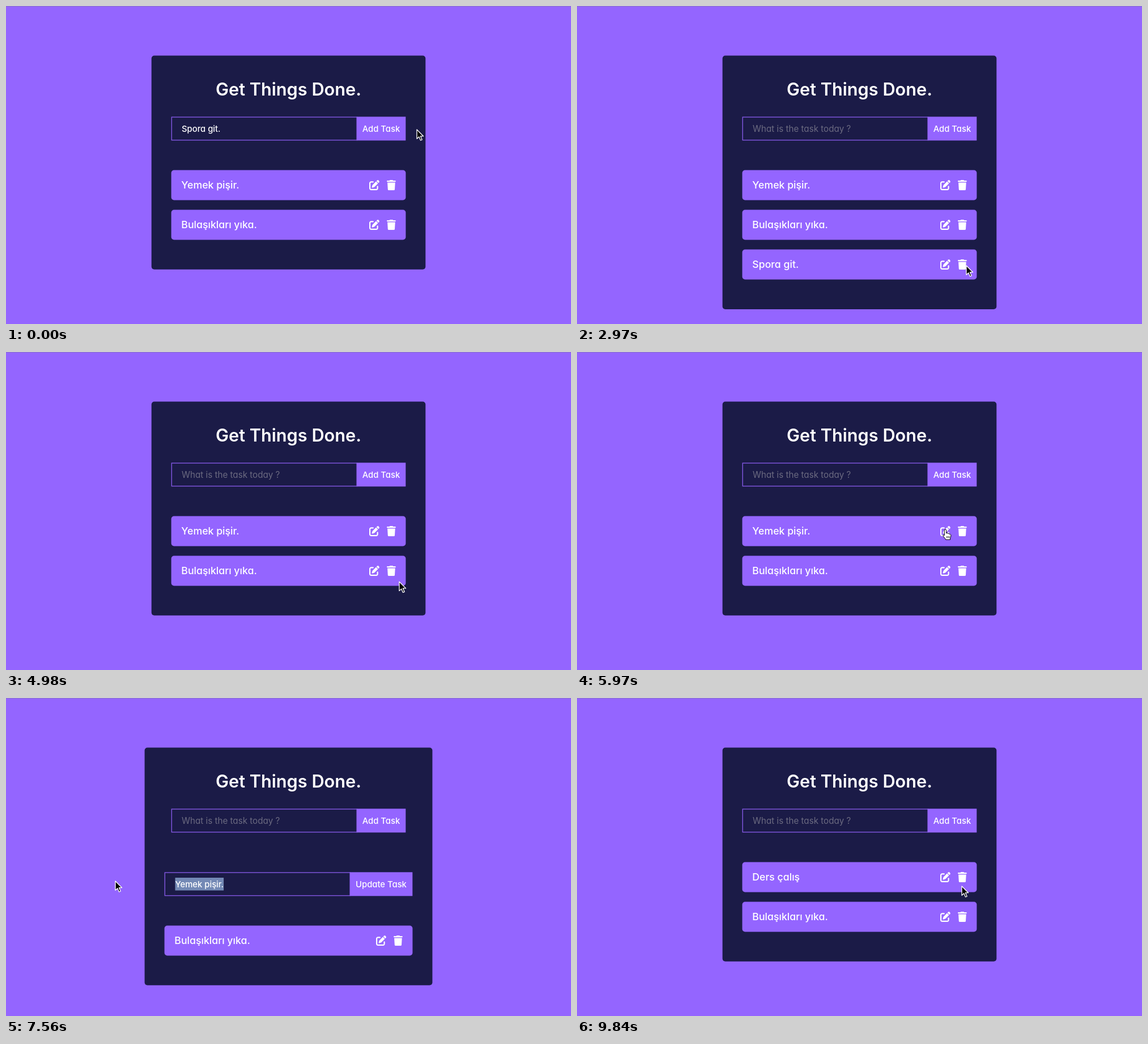
Animation of 997 by 561 pixels, one loop 9.87 s. Source, as an HTML page:

```html
<!DOCTYPE html>
<html lang="tr">
<head>
<meta charset="utf-8">
<title>Tasks</title>
<style>
  html, body { margin: 0; width: 100%; height: 100%; overflow: hidden; background: #9465ff; }
  svg { display: block; width: 997px; height: 561px; }
  text { font-family: Inter, "Open Sans", sans-serif; font-optical-sizing: none;
         font-feature-settings: "cv11"; fill: #fff; white-space: pre; }
  .title { font-size: 30.7px; font-weight: 600; }
  .task { font-size: 17.7px; font-weight: 500; }
  .field { font-size: 14.8px; font-weight: 500; }
  .hint { font-size: 15.2px; fill: #6b6a80; }
  .box { fill: none; stroke: #8257e2; stroke-width: 1.4; }
  .purple { fill: #9465ff; }
  .navy { fill: #1b1b47; }
  .white { fill: #fff; }
</style>
</head>
<body>
<svg viewBox="0 0 997 561">
  <defs>
    <g id="pen">
      <path d="M6.75 3.4H3.4A2.25 2.25 0 0 0 1.1 5.6V14.6A2.25 2.25 0 0 0 3.4 16.9H12.4A2.25 2.25 0 0 0 14.6 14.6V11.25"
            fill="none" stroke="#fff" stroke-width="2.2" stroke-linecap="round"/>
      <path class="white" d="M6.1 8.5Q5.7 8.8 5.6 9.3L4.55 12.4Q4.4 13.6 5.6 13.45L8.7 12.4Q9.2 12.2 9.5 11.95L15.4 6.1 11.95 2.6z
            M16.6 .76a2 2 0 0 0-2.8 0L12.7 1.8 16.2 5.3 17.25 4.2a2 2 0 0 0 0-2.8z"/>
    </g>
    <path id="bin" class="white" d="M1.1 1.1H4.5L5 .5Q5.3 0 5.8 0H10Q10.5 0 10.8 .5L11.3 1.1H14.7a1.1 1.1 0 0 1 0 2.2H1.1a1.1 1.1 0 0 1 0-2.2z
          M1.1 4.5H14.7L14 16.5Q13.9 18 12.3 18H3.5Q1.9 18 1.8 16.5z"/>
    <path id="beam" d="M-3-8Q0-8 0-6V6Q0 8-3 8M3-8Q0-8 0-6M0 6Q0 8 3 8" fill="none"/>
  </defs>

  <rect class="purple" width="997" height="561"/>
  <rect width="997" height="1" fill="#8870cc"/>
  <rect id="panel" class="navy" y="87.6" rx="5"/>
  <text class="title" x="498.5" y="157.5" text-anchor="middle">Get Things Done.</text>

  <rect class="box" x="292.3" y="196" width="327" height="40.6"/>
  <rect class="purple" x="618.7" y="195.3" width="86.6" height="42"/>
  <text class="field" x="662" y="221.5" text-anchor="middle">Add Task</text>
  <text id="hint" class="hint" x="310" y="221.5">What is the task today ?</text>
  <text id="entry" class="field" x="310" y="221.5">Spora git.</text>

  <g id="editor">
    <rect class="box" x="280.3" y="308" width="327" height="40.6"/>
    <rect class="purple" x="606.7" y="307.3" width="110.6" height="42"/>
    <text class="field" x="662" y="333.5" text-anchor="middle">Update Task</text>
    <rect id="mark" y="317" height="22.5" fill="#7389b5"/>
    <text id="draft" class="field" x="298.5" y="333.5"></text>
  </g>
  <g id="list"></g>
  <rect id="caret" class="white" width="1" height="21"/>

  <g id="cursor">
    <path id="arrow" d="M0 0V16.2L3.8 12.7 6.5 19 9.2 17.9 6.5 11.7H11.6z" stroke="#fff" stroke-width="1.3" stroke-linejoin="round"/>
    <g id="hand" stroke="#000" stroke-linejoin="round">
      <path class="white" d="M-1.7 .8Q-1.7-1 0-1T1.7 .8V6Q2.2 5 3.4 5.3 4.5 5.5 4.6 6.5 5.5 5.8 6.5 6.3 7.3 6.7 7.4 7.6 8.3 7.2 9.1 7.8 9.9 8.4 9.8 9.6 9.8 12 8.6 14.2V17H.6Q0 15.3-1.6 13.6-3.4 11.6-4 10.2-4.2 8.6-2.8 8.8L-1.7 9.8z"/>
      <path d="M2.6 11v3M4.8 11v3M7 11v3" stroke-width=".9"/>
    </g>
    <g id="ibeam">
      <use href="#beam" stroke="#fff" stroke-width="2.8"/>
      <use href="#beam" stroke="#000" stroke-width="1.2"/>
    </g>
  </g>
</svg>
<script>
const LOOP = 9870;
const ADD = 1410, REMOVE = 3510, EDIT = 6000, DRAG = 6500, TYPE = 7620, SAVE = 8760;
const KEY_MS = 55;
const OLD_TASK = "Yemek pişir.", NEW_TASK = "Ders çalış";

// time, x, y of the pointer tip
const path = [
  [0, 725, 218], [1080, 725, 218], [1320, 690, 223], [1560, 690, 223],
  [2100, 703, 280], [2940, 687, 458], [3060, 687, 458], [3180, 682, 450],
  [4230, 682, 450], [5010, 694, 405], [5850, 650, 314], [6060, 650, 314],
  [DRAG, 390, 328], [7000, 165, 327], [7200, 165, 327], [7540, 193, 323],
  [8160, 193, 323], [8640, 649, 324], [9600, 649, 324], [9840, 679, 332]
];

const $ = id => document.getElementById(id);
const set = (el, attrs) => { for (const k in attrs) el.setAttribute(k, attrs[k]); };
const show = (el, on) => el.setAttribute("visibility", on ? "visible" : "hidden");
const inside = (p, x, y, w, h) => p.x >= x && p.x < x + w && p.y >= y && p.y < y + h;

const rows = [OLD_TASK, "Bulaşıkları yıka.", "Spora git."].map(label => {
  const g = document.createElementNS("http://www.w3.org/2000/svg", "g");
  g.innerHTML = `<rect class="purple" x="-.4" y="-.4" height="52.8" rx="5"/>
    <text class="task" x="17.3" y="32.3">${label}</text>
    <use href="#pen" y="17"/><use href="#bin" y="17"/>`;
  $("list").append(g);
  const [rect, text, pen, bin] = g.children;
  return { g, rect, text, pen, bin };
});

function pointer(t) {
  let i = 1;
  while (i < path.length - 1 && t > path[i][0]) i++;
  const [t0, x0, y0] = path[i - 1], [t1, x1, y1] = path[i];
  const u = Math.min(1, (t - t0) / (t1 - t0)), e = u * u * (3 - 2 * u);
  return { x: x0 + (x1 - x0) * e, y: y0 + (y1 - y0) * e };
}

function placeRow(row, x, y, w) {
  row.g.setAttribute("transform", `translate(${x} ${y})`);
  row.rect.setAttribute("width", w + .8);
  row.pen.setAttribute("x", w - 64);
  row.bin.setAttribute("x", w - 33);
}

function drawPointer(p, editing, tops, x, w) {
  const overIcon = tops.some(y =>
    inside(p, x + w - 64, y + 17, 18, 18) || inside(p, x + w - 33, y + 17, 14.5, 18));
  const hand = overIcon || inside(p, 619, 195, 86, 42) || editing && inside(p, 607, 308, 110, 41);
  const beam = inside(p, 292, 195, 327, 42) || editing && inside(p, 280, 308, 327, 41);
  show($("hand"), hand);
  show($("ibeam"), beam);
  show($("arrow"), !hand && !beam);
  $("cursor").setAttribute("transform", `translate(${p.x} ${p.y})`);
}

function draw(t) {
  const p = pointer(t);
  const editing = t >= EDIT && t < SAVE;
  const three = t >= ADD && t < REMOVE;
  const x = editing ? 280 : 292, w = editing ? 437 : 413;

  set($("panel"), {
    x: editing ? 244.6 : 256.7, width: editing ? 507.8 : 483.6,
    height: editing ? 419.1 : three ? 447.4 : 377.2
  });
  show($("entry"), t < ADD);
  show($("hint"), t >= ADD);

  const tops = editing ? [402] : three ? [290, 360, 430] : [290, 360];
  const visible = editing ? [rows[1]] : rows.slice(0, tops.length);
  rows.forEach(r => show(r.g, visible.includes(r)));
  visible.forEach((r, i) => placeRow(r, x, tops[i], w));
  rows[0].text.textContent = t < SAVE ? OLD_TASK : NEW_TASK;

  const typing = t >= TYPE;
  const draft = $("draft");
  draft.textContent = typing ? NEW_TASK.slice(0, 1 + Math.floor((t - TYPE) / KEY_MS)) : OLD_TASK;
  show($("editor"), editing);
  const end = 298.5 + draft.getComputedTextLength();
  const selected = editing && t >= DRAG && !typing;
  const from = Math.min(end, Math.max(298.5, t > 7000 ? 0 : p.x));
  set($("mark"), { x: from, width: end - from });
  show($("mark"), selected);

  const firstCaret = t >= 90 && t < 590;
  show($("caret"), firstCaret || editing && typing && t < 8400);
  set($("caret"), firstCaret
    ? { x: 311 + $("entry").getComputedTextLength(), y: 206 }
    : { x: end + 1, y: 318 });

  drawPointer(p, editing, tops, x, w);
}

const start = performance.now();
function tick() {
  draw((performance.now() - start) % LOOP);
  requestAnimationFrame(tick);
}
tick();
</script>
</body>
</html>
```
